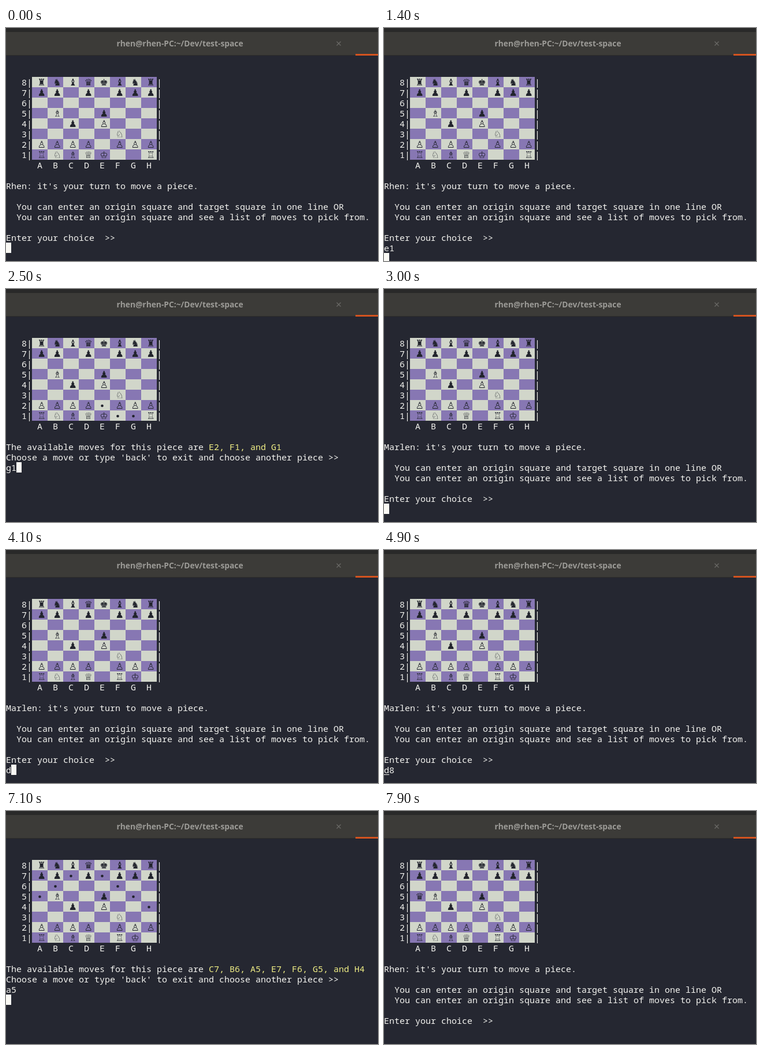
An HTML page that plays this animation: 644x405 px, repeating every 8000 ms.

```html
<!DOCTYPE html>
<html lang="en">
<head>
<meta charset="utf-8">
<title>Terminal chess</title>
<style>
  html, body { margin: 0; width: 100%; height: 100%; overflow: hidden; background: #252731; }
  svg { display: block; width: 644px; height: 405px; }
  text { white-space: pre; }
  .mono { font: 15px "Noto Sans Mono", "DejaVu Sans Mono", monospace; fill: #f4f4f0; }
  .hint { fill: #f0ee85; }
  .piece { font: 16px "DejaVu Sans", sans-serif; fill: #22242d; text-anchor: middle; }
  .title { font: bold 13.8px "Open Sans", "Noto Sans", sans-serif; fill: #9c9b97; text-anchor: middle; }
</style>
</head>
<body>
<svg viewBox="0 0 644 405">
  <rect width="644" height="405" fill="#252731"/>
  <rect width="644" height="7" fill="#292929"/>
  <rect y="7" width="644" height="41" fill="#3c3b38"/>
  <rect y="47" width="644" height="1" fill="#2c2b29"/>
  <rect x="605" y="45" width="39" height="3" fill="#d4531f"/>
  <text class="title" x="301" y="32">rhen@rhen-PC:~/Dev/test-space</text>
  <path d="M572.5 23.5l7 7m0-7l-7 7" stroke="#6b6a67" stroke-width="1.2"/>
  <g id="screen"></g>
</svg>
<script>
const CELL = 9, LINE = 18, TOP = 85, BOARD_X = 45, LOOP = 8000;
const screen = document.getElementById("screen");
const GLYPHS = Object.fromEntries([..."KQRBNPkqrbnp"].map((c, i) => [c, String.fromCharCode(0x2654 + i)]));

const lineY = row => TOP + row * LINE;
const escapeText = s => s.replace(/&/g, "&amp;").replace(/</g, "&lt;").replace(/>/g, "&gt;");
const write = (col, row, s, extra = "") =>
  `<text class="mono ${extra}" x="${col * CELL}" y="${lineY(row) + 15}">${escapeText(s)}</text>`;
const rect = (x, y, w, h, fill) =>
  `<rect x="${x}" y="${y}" width="${w}" height="${h}" fill="${fill}" shape-rendering="crispEdges"/>`;

const MIDDLE = "pp.p.ppp/......../.B..p.../..p.P.../.....N../PPPP.PPP/";
const start = "rnbqkbnr/" + MIDDLE + "RNBQK..R";
const castled = "rnbqkbnr/" + MIDDLE + "RNBQ.RK.";
const queenOut = castled.replace("rnbq", "rnb.").replace("/.B", "/qB");

function drawBoard(position, moves) {
  let out = "";
  position.split("/").forEach((rank, r) => {
    out += write(3, r, `${8 - r}|`) + write(29, r, "|");
    [...rank].forEach((piece, f) => {
      const x = BOARD_X + f * 27, y = lineY(r);
      out += rect(x, y, 27, LINE, (r + f) % 2 ? "#8777b3" : "#d1d6ca");
      if (GLYPHS[piece]) out += `<text class="piece" x="${x + 16.7}" y="${y + 15}">${GLYPHS[piece]}</text>`;
      if (moves.includes("ABCDEFGH"[f] + (8 - r)))
        out += `<circle cx="${x + 13.5}" cy="${y + 10}" r="2.3" fill="#22242d"/>`;
    });
  });
  return out + write(6, 8, [..."ABCDEFGH"].join("  "));
}

function turn(position, player) {
  return {
    inputRow: 16,
    markup: drawBoard(position, []) +
      write(0, 10, `${player}: it's your turn to move a piece.`) +
      write(2, 12, "You can enter an origin square and target square in one line OR") +
      write(2, 13, "You can enter an origin square and see a list of moves to pick from.") +
      write(0, 15, "Enter your choice  >>")
  };
}

function options(position, moves) {
  const intro = "The available moves for this piece are ";
  const list = moves.slice(0, -1).join(", ") + ", and " + moves.at(-1);
  return {
    inputRow: 12,
    markup: drawBoard(position, moves) +
      write(0, 10, intro) + write(intro.length, 10, list, "hint") +
      write(0, 11, "Choose a move or type 'back' to exit and choose another piece >>")
  };
}

const firstTurn = turn(start, "Rhen");
const kingMoves = options(start, ["E2", "F1", "G1"]);
const secondTurn = turn(castled, "Marlen");
const queenMoves = options(castled, ["C7", "B6", "A5", "E7", "F6", "G5", "H4"]);
const thirdTurn = turn(queenOut, "Rhen");

// Each step: start time, scene, typed input, cursor state.
const steps = [
  [0, firstTurn, "", "block"],
  [500, firstTurn, "", "off"],
  [800, firstTurn, "e", "block"],
  [1000, firstTurn, "e1", "block"],
  [1400, firstTurn, "e1", "next"],
  [1500, kingMoves, "", "block"],
  [2000, kingMoves, "", "off"],
  [2200, kingMoves, "", "block"],
  [2500, kingMoves, "g1", "block"],
  [2900, kingMoves, "g1", "next"],
  [3000, secondTurn, "", "block"],
  [3500, secondTurn, "", "off"],
  [4100, secondTurn, "d", "block"],
  [4300, secondTurn, "d8", "block"],
  [4900, secondTurn, "d8", "underline"],
  [5000, queenMoves, "", "block"],
  [5800, queenMoves, "", "off"],
  [6100, queenMoves, "", "block"],
  [6200, queenMoves, "a", "block"],
  [6800, queenMoves, "a5", "block"],
  [7100, queenMoves, "a5", "next"],
  [7200, thirdTurn, "", "block"],
  [7900, thirdTurn, "", "off"]
];

function drawCursor(kind, row, col) {
  const color = "#faf9f4";
  if (kind === "block") return rect(col * CELL, lineY(row), CELL, LINE, color);
  if (kind === "next") return rect(0, lineY(row + 1), CELL, LINE, color);
  if (kind === "underline") return rect(0, lineY(row) + 17, CELL, 1, color);
  return "";
}

let shown;
function render(time) {
  const step = steps.findLast(([at]) => at <= time);
  if (step === shown) return;
  shown = step;
  const [, scene, typed, cursor] = step;
  screen.innerHTML = scene.markup + write(0, scene.inputRow, typed) +
    drawCursor(cursor, scene.inputRow, typed.length);
}

const origin = performance.now();
function tick() {
  render((performance.now() - origin) % LOOP);
  requestAnimationFrame(tick);
}
tick();
</script>
</body>
</html>
```
